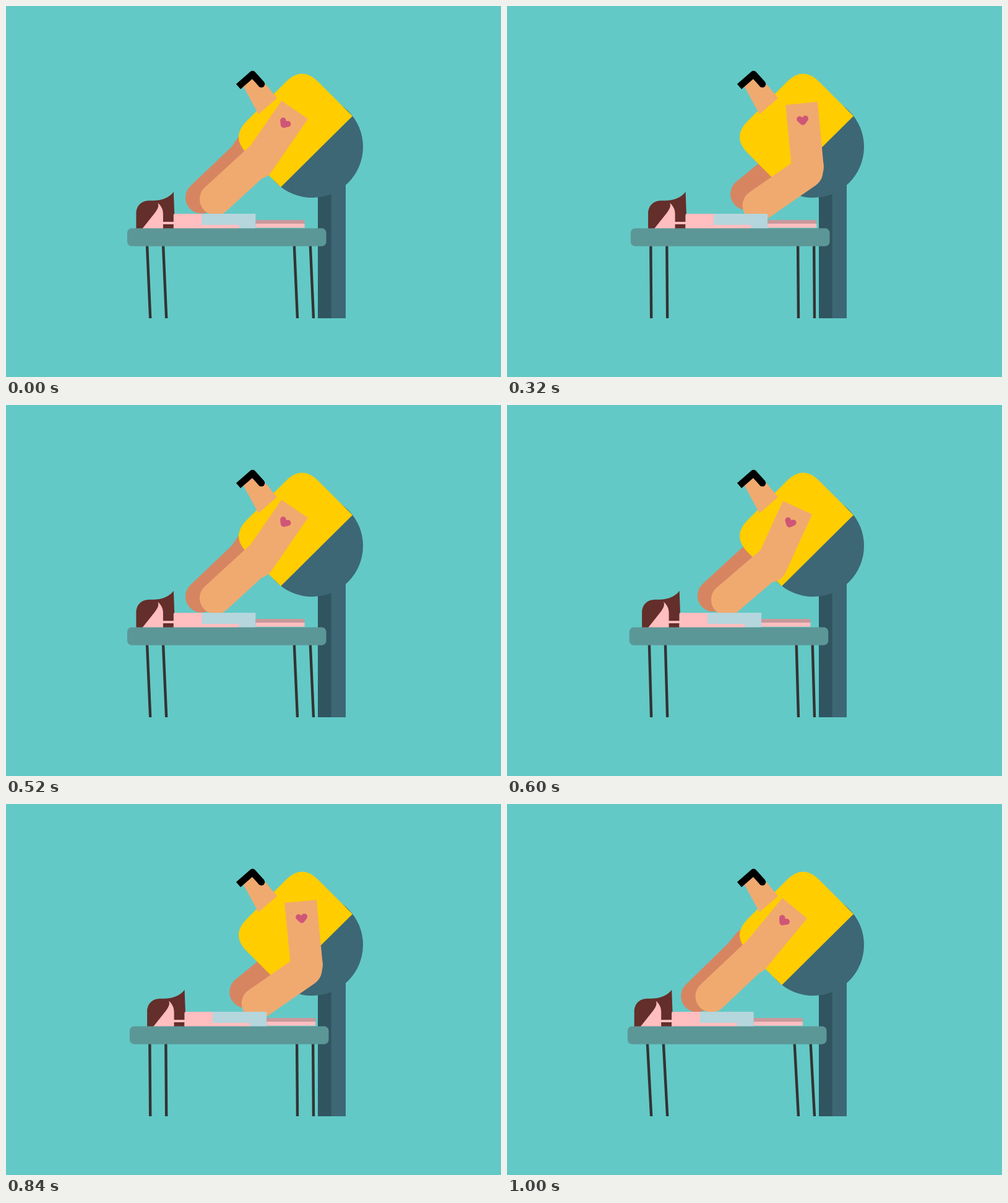
Animation, 800 px wide and 600 px high, one loop 1.04 s. Source, as an HTML page:

```html
<!DOCTYPE html>
<html lang="en">
<head>
<meta charset="utf-8">
<title>Massage</title>
<style>
  html, body { margin: 0; width: 100%; height: 100%; overflow: hidden; background: #63c9c6; }
  svg { display: block; width: 100vw; height: 100vh; }
  .skin { fill: #f0aa70; }
  .shade { stroke: #d78561; }
  .limb { stroke-width: 51.8; stroke-linecap: round; }
  .trousers { fill: #3d6775; }
  .pink { fill: #ffbec0; }
  .hair { fill: #642e2a; }
  .cloth { fill: #b5d6dc; }
</style>
</head>
<body>
<svg viewBox="0 0 800 600">
  <rect width="800" height="600" fill="#63c9c6"/>

  <!-- masseur -->
  <rect x="504" y="290" width="22" height="215" fill="#305561"/>
  <circle class="trousers" cx="494.8" cy="227.8" r="82.2"/>
  <rect class="trousers" x="525.7" y="270" width="23.3" height="235"/>
  <line id="rearUpper" class="limb shade"/>
  <line id="rearFore" class="limb shade"/>
  <path fill="#ffcd00" d="M560 178L504.5 122.5Q478.5 96.5 452.5 122.5L389 186Q363 212 389 238L444 293Z"/>
  <path class="skin" d="M383 129L398 112L412 122L420 127L438 149L408 175Z"/>
  <path fill="none" stroke="#000" stroke-width="11" stroke-linejoin="round" d="M375.5 130.3L398.4 110.3L412.8 126.3"/>
  <circle cx="412.8" cy="126.3" r="5.5"/>

  <!-- near arm, drawn around its pivot -->
  <line id="fore" class="limb" stroke="#f0aa70"/>
  <g id="upper">
    <rect class="skin" x="-7.9" y="9.6" width="51.8" height="104"/>
    <circle class="skin" cx="18" cy="113.6" r="25.9"/>
    <path transform="translate(17.2 37.2)" fill="none" stroke="#cf5677" stroke-width="9.6"
      stroke-linecap="round" stroke-linejoin="round" d="M-4.7 -2.6L0 2.6L4.7 -2.6"/>
  </g>

  <!-- client, x = 0 at the shoulders -->
  <g id="client">
    <path class="hair" d="M-60.5 360V336C-60.5 323 -52 314.8 -39 314.8H-34C-18 314.8 -6 309 0 300.5L1.3 336L0 338V360Z"/>
    <path class="pink" d="M-50.5 360L-31 335.5C-25 328 -23.5 323 -25.5 318.5C-19 324 -17 330 -17 336.5V360Z"/>
    <rect class="pink" x="-18" y="349" width="20" height="4"/>
    <path class="pink" d="M0 360V338Q0 336 2 336H50V360Z"/>
    <rect class="cloth" x="45.5" y="336" width="87" height="24"/>
    <rect class="pink" x="0" y="354" width="105.5" height="6"/>
    <rect x="132.5" y="346" width="79.2" height="6.5" fill="#c8999c"/>
    <rect class="pink" x="132.5" y="352" width="79.2" height="6.6"/>
  </g>

  <!-- table -->
  <g id="legs" stroke="#333" stroke-width="4.4"></g>
  <rect id="top" y="359.6" width="321.6" height="28.8" rx="7" fill="#5c9797"/>
</svg>
<script>
  const STEP = 40, CYCLE = 13, PULL = 9, FORE = 95;
  const $ = id => document.getElementById(id);
  const set = (el, attrs) => { for (const k in attrs) el.setAttribute(k, attrs[k]); };
  const rad = deg => deg * Math.PI / 180;
  const mix = (a, b, p) => a + (b - a) * p;

  const legs = [233.2, 259.2, 471, 497].map(x => {
    const leg = document.createElementNS('http://www.w3.org/2000/svg', 'line');
    set(leg, { x2: x, y1: 380, y2: 505 });
    $('legs').append(leg);
    return { leg, x };
  });

  // Lays a forearm from the hand and returns the elbow.
  function forearm(el, x, y, deg) {
    const ex = x + FORE * Math.cos(rad(deg));
    const ey = y - FORE * Math.sin(rad(deg));
    set(el, { x1: x, y1: y, x2: ex, y2: ey });
    return [ex, ey];
  }

  // p: 0 = arms stretched, 1 = arms pulled in
  function pose(p) {
    const swing = mix(39.5, -5.5, p);
    const slide = 1 - (1 - p) ** 2;

    set($('upper'), { transform: `translate(457.2 149.7) rotate(${swing})` });
    forearm($('fore'), mix(330.4, 406.6, p), mix(311, 322.6, p), mix(43.4, 34.8, p));

    const [ex, ey] = forearm($('rearFore'), mix(307, 387, p), mix(310.6, 304, p), mix(44.2, 39.2, p));
    set($('rearUpper'), {
      x1: ex, y1: ey,
      x2: ex + 25 * Math.sin(rad(swing)),
      y2: ey - 25 * Math.cos(rad(swing))
    });

    set($('client'), { transform: `translate(${266.2 + 22.4 * slide} 0)` });
    const shift = 5 * slide;
    set($('top'), { x: 194.9 + shift });
    for (const { leg, x } of legs) set(leg, { x1: x - 6.7 + shift * 1.16 });
  }

  const start = performance.now();
  function draw(now) {
    const step = Math.floor(Math.max(0, now - start) / STEP);
    const t = (step + 1) % CYCLE;
    pose(t <= PULL ? t / PULL : (CYCLE - t) / (CYCLE - PULL));
    requestAnimationFrame(draw);
  }
  draw(start);
</script>
</body>
</html>
```
